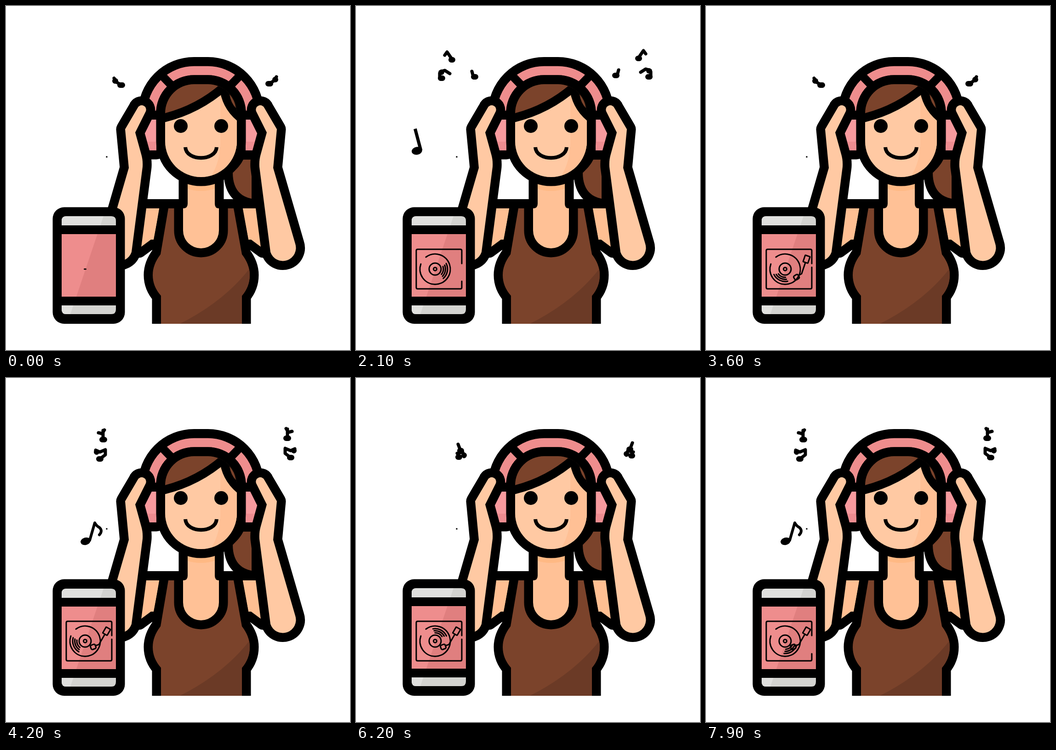
An HTML page for the animation above (8000 ms loop, 748 px wide and 748 px high).

```html
<!DOCTYPE html>
<html lang="en">
<head>
<meta charset="utf-8">
<title>Listening to music</title>
<style>
  html, body { margin: 0; width: 100%; height: 100%; overflow: hidden; background: #fff; }
  svg { display: block; width: 100vw; height: 100vh; }
  .ink { stroke: #000; stroke-width: 39; stroke-linejoin: round; paint-order: stroke; }
  .line { fill: none; stroke: #000; }
  .round { stroke-linecap: round; stroke-linejoin: round; }
</style>
</head>
<body>
<svg viewBox="0 0 748 748">
  <defs>
    <path id="torsoShape" d="M353 440L336 540Q319 562 319 585Q319 610 337 630V730H513V630Q530 610 530 585Q530 562 513 540L495 440Z"/>
    <path id="headShape" d="M346 233A63 63 0 0 1 409 170H439A63 63 0 0 1 502 233V294A78 78 0 0 1 346 294Z"/>
    <path id="bandShape" d="M316.500 236V233A92.500 92.500 0 0 1 409 140.500H439A92.500 92.500 0 0 1 531.500 233V236"/>
    <clipPath id="stageClip"><rect width="748" height="691"/></clipPath>
    <clipPath id="torsoClip"><use href="#torsoShape"/></clipPath>
    <clipPath id="headClip"><use href="#headShape"/></clipPath>
    <clipPath id="neckClip"><rect x="395" y="380" width="59" height="40"/></clipPath>
    <clipPath id="glassClip">
      <path d="M121 477V467q0-10 10-10H229q10 0 10 10V477ZM121 496H239V632H121ZM121 651H239V660q0 10-10 10H131q-10 0-10-10Z"/>
    </clipPath>

    <path id="upperArm" class="ink" fill="#ffbf92" d="M514 440H546L560 528L533 508L527 508Z"/>
    <path id="forearm" class="ink" fill="#ffc9a3" d="M562 222L589 268L581 352L629 517A28 28 0 0 1 575 535L551 350Q550 335 554 322L567 275L544 229A9.5 9.5 0 0 1 562 222Z"/>
    <g id="cup">
      <path class="ink" fill="#f79a9e" d="M521 247H537L548 280L537 314H521Z"/>
      <path fill="#ee8d91" d="M521 295H543L537 314H521Z"/>
    </g>
    <g id="notes">
      <path id="stems" class="line round" stroke-width="7"/>
      <path id="heads" class="line round" stroke-width="12"/>
    </g>
  </defs>

  <g clip-path="url(#stageClip)">
    <path class="ink" fill="#7b432b" d="M516 334Q508 350 493 362Q493 411 534 419V334Z"/>
    <use href="#upperArm"/>
    <use href="#upperArm" transform="matrix(-1 0 0 1 848 0)"/>

    <use href="#torsoShape" class="ink" fill="#7b432b"/>
    <path clip-path="url(#torsoClip)" fill="#6b3a26" d="M535 564Q478 641 376 692H540Z"/>
    <rect x="306" y="420" width="236" height="20"/>

    <path class="ink" fill="#ffc196" d="M395 350V430Q395 440 385 440V488A39 39 0 0 0 463 488V440Q454 440 454 430V350Z"/>
    <ellipse clip-path="url(#neckClip)" cx="424" cy="382" rx="46" ry="20" fill="#ffb984"/>

    <use href="#bandShape" class="line" stroke-width="59"/>
    <use href="#bandShape" fill="none" stroke="#ee8d8d" stroke-width="19.500"/>
    <path class="line" stroke-width="18" d="M368 181L338 150M480 181L510 150"/>
    <use href="#cup"/>
    <use href="#cup" transform="matrix(-1 0 0 1 848 0)"/>

    <use href="#headShape" class="ink" fill="#7b432b"/>
    <g clip-path="url(#headClip)">
      <path fill="#ffc9a3" d="M336 245Q416 231 471 178Q475 222 512 247V390H336Z"/>
      <path fill="#ffc095" d="M466 182V300Q464 350 438 380H512V247Q475 222 471 178Z"/>
      <path class="line" stroke-width="19" d="M332 246Q414 229 476 174"/>
      <path class="line" stroke-width="18" d="M473 174Q477 220 514 247"/>
      <path d="M466 168L510 190V250Q488 206 470 180Z"/>
      <path fill="#7b432b" d="M486 192Q497 204 500 222Q489 211 486 192Z"/>
    </g>
    <circle cx="380" cy="261" r="15"/>
    <circle cx="468" cy="261" r="15"/>
    <path class="line" stroke-width="8" d="M390 307C392 338 456 338 458 307"/>

    <use href="#forearm"/>
    <use href="#forearm" transform="matrix(-1 0 0 1 848 0)"/>

    <rect x="101.500" y="437.500" width="157" height="253.500" rx="25"/>
    <g id="glass">
      <g clip-path="url(#glassClip)">
        <path fill="#d3d3d0" d="M121 457H239V670H121Z"/>
        <path fill="#e0e0de" d="M121 457H212L140 670H121Z"/>
        <path fill="#e07f7f" d="M121 490H239V640H121Z"/>
        <path fill="#ee8d8d" d="M121 490H200.800L150.200 640H121Z"/>
      </g>
    </g>
  </g>

  <g class="line round" stroke-width="3">
    <path id="border" d="M230 560V532Q230 529 227 529H134Q131 529 131 532V612Q131 615 134 615H227Q230 615 230 612V568"/>
    <g id="disc">
      <path d="M141 561A33 33 0 1 0 152 546"/>
      <circle r="13" cx="172" cy="572"/>
      <circle r="3.500" cx="172" cy="572"/>
      <g id="grooves"></g>
    </g>
    <g id="arm">
      <rect x="213" y="543" width="11" height="15" rx="1"/>
      <path d="M218.500 559V584L213 590"/>
      <rect x="205" y="589" width="10" height="11" rx="3" transform="rotate(40 210 595)"/>
    </g>
  </g>
  <ellipse id="seed" cx="172" cy="572" rx="3" ry="1.500"/>

  <use href="#notes"/>
  <use href="#notes" transform="matrix(-1 0 0 1 823 -3)"/>

  <g id="eighth">
    <ellipse cx="173" cy="355" rx="11" ry="8" transform="rotate(-15 173 355)"/>
    <path class="line round" stroke-width="6" d="M182 353L193 315Q197 322 203 325Q211 332 203 341"/>
  </g>
  <g id="quarter">
    <ellipse cx="132.500" cy="315" rx="11.500" ry="8.500" transform="rotate(-10 132 315)"/>
    <path class="line" stroke-width="7" d="M128.500 267L141 314"/>
  </g>
  <rect x="217.500" y="326.500" width="3" height="3"/>
</svg>

<script>
  const LOOP = 8000, STEP = 100, BEAT = 12;
  const $ = id => document.getElementById(id);
  const ramp = (t, from, to) => Math.min(1, Math.max(0, (t - from) / (to - from)));
  const show = (id, on) => $(id).setAttribute('visibility', on ? 'visible' : 'hidden');

  // Small notes beside the headphones: [stems, heads], two steps per pose.
  const poses = [
    ['M235 157l6 9l10 6', 'M237 163h1M248 172h5'],
    ['M222 144l5 13M220 164l12-3l3 10', 'M226 158h3M222 172h3M235 168h0'],
    ['M208 128l9-4l2 19M206 160l16-4v12', 'M217 145h3M210 175h3M206 164h0'],
    ['M201 119l8 2l5-8M211 114v20M195 157l9 4l12-5v11l-12 9', 'M209 134h5M202 176h4M197 161h0'],
    ['M193 107l5-7l11 16M183 143l10-3l11 7M182 146v8M252 142l3 11', 'M207 117h3M184 157h4M186 144h0M256 154h4'],
    ['M187 104l5-7l11 12M178 142l8-12l10 8M239 140l7 8', 'M203 110h6M176 149h6M192 139h6M184 130h0M246 149h7']
  ];

  function arc(r, half) {
    const x = 172 + r * Math.cos(half), y = r * Math.sin(half);
    return `<path d="M${x} ${572 - y}A${r} ${r} 0 0 1 ${x} ${572 + y}"/>`;
  }
  $('grooves').innerHTML = arc(18, .5) + arc(22.5, .58) + arc(27, .66);

  const border = $('border'), length = border.getTotalLength();

  function drawTurntable(t) {
    const grow = ramp(t, 0, 900);
    show('seed', t === 0);
    show('disc', t > 0);
    $('disc').setAttribute('transform', `translate(172 572) scale(${grow}) translate(-172 -572)`);
    $('grooves').setAttribute('transform', `rotate(${-136 + .07 * t} 172 572)`);

    const drawn = 16 + (length - 16) * ramp(t, 1100, 2200) - 32 * ramp(t, 7400, 7900);
    show('border', t >= 1100);
    border.setAttribute('stroke-dasharray', `${drawn} ${length * 2}`);

    show('arm', t >= 2200);
    $('arm').setAttribute('transform', `rotate(${30 * ramp(t, 3100, 3900)} 218.5 551)`);
  }

  function draw(t) {
    const beat = t / STEP % BEAT;
    const [stems, heads] = poses[Math.floor(beat / 2)];
    $('stems').setAttribute('d', stems);
    $('heads').setAttribute('d', heads);

    const middle = beat >= 4 && beat < 8;
    show('eighth', middle);
    show('quarter', beat >= 8);
    $('glass').setAttribute('transform', `translate(0 ${middle ? 1 : 0})`);
    drawTurntable(t);
  }

  const start = performance.now();
  function tick() {
    const t = (performance.now() - start) % LOOP;
    draw(Math.floor(t / STEP) * STEP);
    requestAnimationFrame(tick);
  }
  tick();
</script>
</body>
</html>
```
